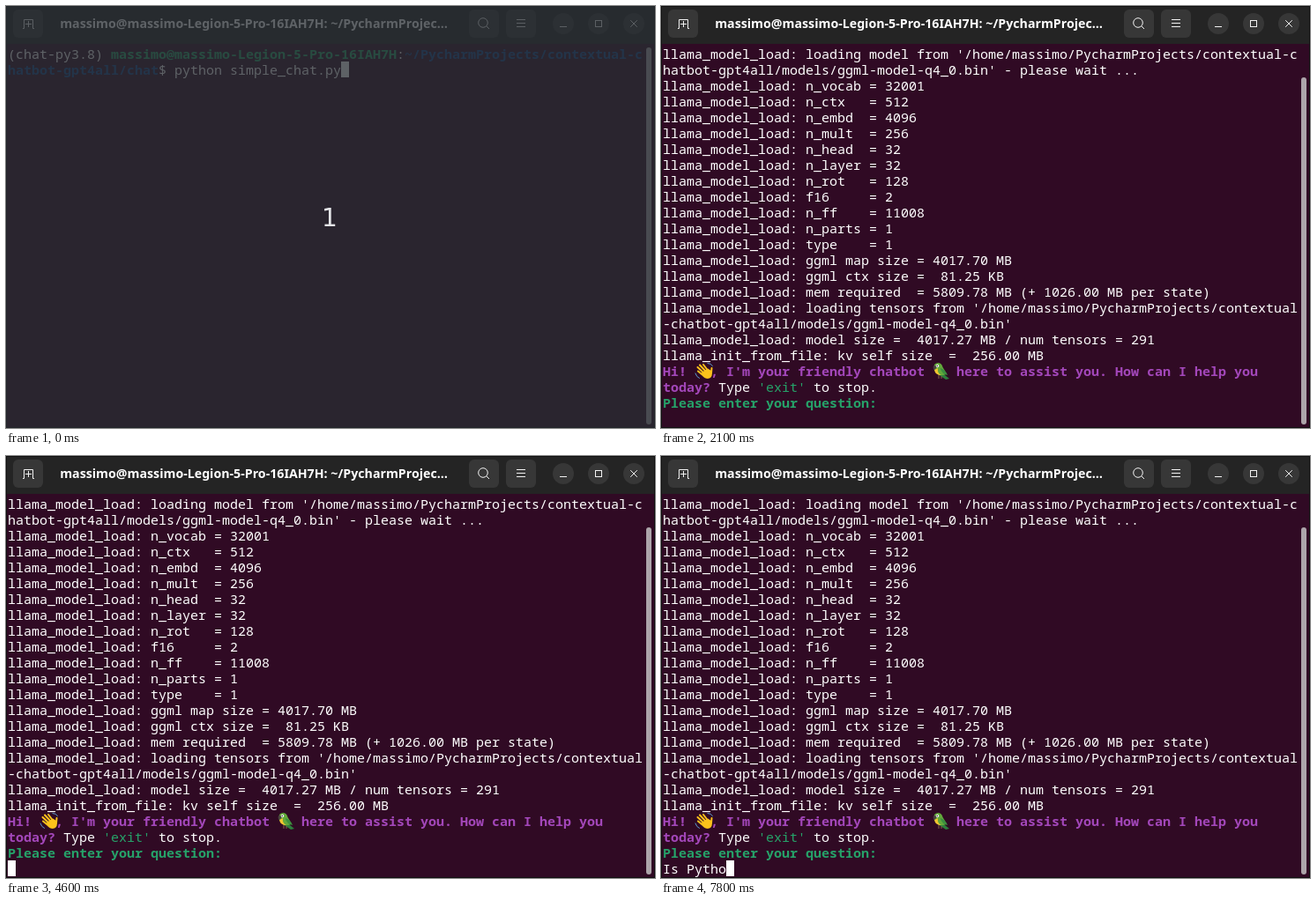
Write an HTML page that moves like this. It is 736 px wide and 479 px high and loops after 8000 ms.

```html
<!DOCTYPE html>
<html lang="en">
<head>
<meta charset="utf-8">
<title>Terminal chat</title>
<style>
html, body { margin: 0; width: 736px; height: 479px; overflow: hidden; background: #111; }
svg { display: block; }
text { white-space: pre; fill: #fff; }
.term text { font: 500 15px "Noto Sans Mono", "DejaVu Sans Mono", monospace; font-variant-ligatures: none; }
.title { font: 700 14.2px "Noto Sans", sans-serif; text-anchor: middle; }
.count { font: 28px "DejaVu Sans", sans-serif; text-anchor: middle; fill: #e4e5e8; }
.user, .path, .hello, .ask { font-weight: 700; }
.user, .ask, .cmd { fill: #26a269; }
.path { fill: #12488b; }
.hello { fill: #a347ba; }
.btn { fill: #373737; }
.icon { fill: none; stroke: #f2f2f2; }
</style>
</head>
<body>
<svg width="736" height="479" viewBox="0 0 736 479">
  <rect width="736" height="479" fill="#111"/>
  <rect x="1" y="1" width="734" height="42" fill="#242424"/>
  <rect x="1" y="43" width="734" height="435" fill="#300a24"/>

  <g class="btn">
    <rect x="8" y="4" width="34" height="32" rx="6"/>
    <rect x="525" y="4" width="34" height="32" rx="6"/>
    <rect x="567" y="4" width="34" height="32" rx="6"/>
    <circle cx="632" cy="20" r="12"/>
    <circle cx="672" cy="20" r="12"/>
    <circle cx="712" cy="20" r="12"/>
  </g>
  <g class="icon">
    <path d="M19 25.5H20.5V15.5H30.5V25.5H32M25.5 17V24M22 20.500H29"/>
    <circle cx="541" cy="19" r="5.3"/>
    <path d="M544.800 22.800L548 26"/>
    <path d="M579 15.5H589M579 19.5H589M579 23.5H589"/>
    <path d="M628 23.5H636"/>
    <rect x="668.5" y="16.5" width="7" height="7"/>
    <path d="M708.2 16.2L715.8 23.8M715.8 16.2L708.2 23.8"/>
  </g>
  <text class="title" x="281" y="25">massimo@massimo-Legion-5-Pro-16IAH7H: ~/PycharmProjec…</text>

  <g class="term">
    <g id="prompt"></g>
    <g id="log"></g>
    <g id="greeting">
      <g fill="#fcc21b" stroke="#fcc21b" stroke-linecap="round">
        <path d="M46 416L53 411.500L57 414Q59 419 56 422Q51 424.500 47.500 420.500Z" stroke="none"/>
        <path d="M47.500 419L42 414.500M48.500 416.500L41.500 410M50.500 414.500L44 407.500M53 413.500L48 407M57 417L57.500 411" stroke-width="2"/>
        <path d="M39 417Q40 421 43.500 422.500M53 405.500Q56.500 405.500 58.500 408.500" fill="none" stroke="#5d9bd0"/>
      </g>
      <path d="M317 415L327 423L323 424L314 418Z" fill="#2d7f3c"/>
      <path d="M309.500 411Q309 405 314.500 405Q318.500 405.500 319.500 410L324 417.500Q319 420.500 314 418Q310 415 309.500 411Z" fill="#62a83b"/>
      <path d="M316.500 411Q322 412 325 419Q319 418.500 316.500 411Z" fill="#3b8f3f"/>
      <path d="M310 413Q311 419 318 419Q313 417 314 411Z" fill="#f2c531"/>
      <path d="M310 408Q307.500 409 309.500 413Q312 412 313 409Z" fill="#49433f"/>
      <circle cx="313.500" cy="408.500" r="1.700" fill="#fff"/>
      <circle cx="313.300" cy="408.500" r=".8" fill="#222"/>
      <path d="M315 419V423M318 420V423" stroke="#85604a"/>
    </g>
    <text id="typed" x="2" y="474"></text>
    <rect id="cursor" width="9" height="18" fill="#fff"/>
  </g>
  <rect id="thumb" x="726" width="6" rx="3" fill="#aca5aa"/>

  <g id="countdown">
    <rect width="736" height="479" fill="#282e33" fill-opacity=".75"/>
    <text class="count" x="367" y="250">1</text>
  </g>
</svg>
<script>
const LOOP = 8000, COL = 9, ROW = 18, LEFT = 2, TOP = 45, BASE = 15;
const $ = id => document.getElementById(id);
const rowY = row => TOP + row * ROW;

// A line is a list of [style, text] pairs.
function addLine(group, row, parts) {
  const ns = "http://www.w3.org/2000/svg";
  const text = document.createElementNS(ns, "text");
  text.setAttribute("x", LEFT);
  text.setAttribute("y", rowY(row) + BASE);
  for (const [style, words] of parts) {
    const span = document.createElementNS(ns, "tspan");
    span.setAttribute("class", style);
    span.textContent = words;
    text.append(span);
  }
  group.append(text);
}

const promptLines = [
  [["", "(chat-py3.8) "], ["user", "massimo@massimo-Legion-5-Pro-16IAH7H"], ["", ":"],
   ["path", "~/PycharmProjects/contextual-c"]],
  [["path", "hatbot-gpt4all/chat"], ["", "$ python simple_chat.py"]]
];
const load = "llama_model_load: ";
const params = {
  n_vocab: 32001, n_ctx: 512, n_embd: 4096, n_mult: 256, n_head: 32, n_layer: 32,
  n_rot: 128, f16: 2, n_ff: 11008, n_parts: 1, type: 1
};
const logLines = [
  load + "loading model from '/home/massimo/PycharmProjects/contextual-c",
  "hatbot-gpt4all/models/ggml-model-q4_0.bin' - please wait ...",
  ...Object.entries(params).map(([key, value]) => `${load}${key.padEnd(7)} = ${value}`),
  load + "ggml map size = 4017.70 MB",
  load + "ggml ctx size =  81.25 KB",
  load + "mem required  = 5809.78 MB (+ 1026.00 MB per state)",
  load + "loading tensors from '/home/massimo/PycharmProjects/contextual",
  "-chatbot-gpt4all/models/ggml-model-q4_0.bin'",
  load + "model size =  4017.27 MB / num tensors = 291",
  "llama_init_from_file: kv self size  =  256.00 MB"
];
// Two blank cells are left for each emoji.
const greetingLines = [
  [["hello", "Hi!   , I'm your friendly chatbot    here to assist you. How can I help you"]],
  [["hello", "today?"], ["", " Type "], ["cmd", "'exit'"], ["", " to stop."]],
  [["ask", "Please enter your question:"]]
];
promptLines.forEach((parts, i) => addLine($("prompt"), i, parts));
logLines.forEach((line, i) => addLine($("log"), i, [["", line]]));
greetingLines.forEach((parts, i) => addLine($("greeting"), logLines.length + i, parts));

const OUTPUT = 1700, READY = 2100;
const question = "Is Pytho";
// [time, column, row, visible]
const cursorSteps = [
  [0, 42, 1, true], [300, 42, 1, false], [800, 42, 1, true],
  [1000, 0, 2, true], [1600, 0, 2, false],
  [2200, 0, 23, true], [2800, 0, 23, false], [3400, 0, 23, true], [4000, 0, 23, false],
  [4600, 0, 23, true], [5200, 0, 23, false], [5800, 0, 23, true],
  [6000, 1, 23, true], [6200, 2, 23, true], [6500, 3, 23, true], [7200, 4, 23, true],
  [7500, 5, 23, true], [7600, 6, 23, true], [7800, 8, 23, true]
];
const show = (id, on) => $(id).setAttribute("visibility", on ? "visible" : "hidden");

function draw(t) {
  const ready = t >= READY;
  const [, col, row, visible] = cursorSteps.findLast(step => step[0] <= t);
  show("countdown", t < 100);
  show("prompt", !ready);
  show("log", t >= OUTPUT);
  show("greeting", ready);
  $("log").setAttribute("transform", `translate(0 ${ready ? 0 : 2 * ROW})`);
  $("typed").textContent = ready ? question.slice(0, col) : "";
  $("cursor").setAttribute("x", LEFT + col * COL);
  $("cursor").setAttribute("y", rowY(row));
  show("cursor", visible);
  const thumbTop = ready ? 81 : 47;
  $("thumb").setAttribute("y", thumbTop);
  $("thumb").setAttribute("height", 475 - thumbTop);
}

const start = performance.now();
function tick() {
  draw((performance.now() - start) % LOOP);
  requestAnimationFrame(tick);
}
tick();
</script>
</body>
</html>
```
